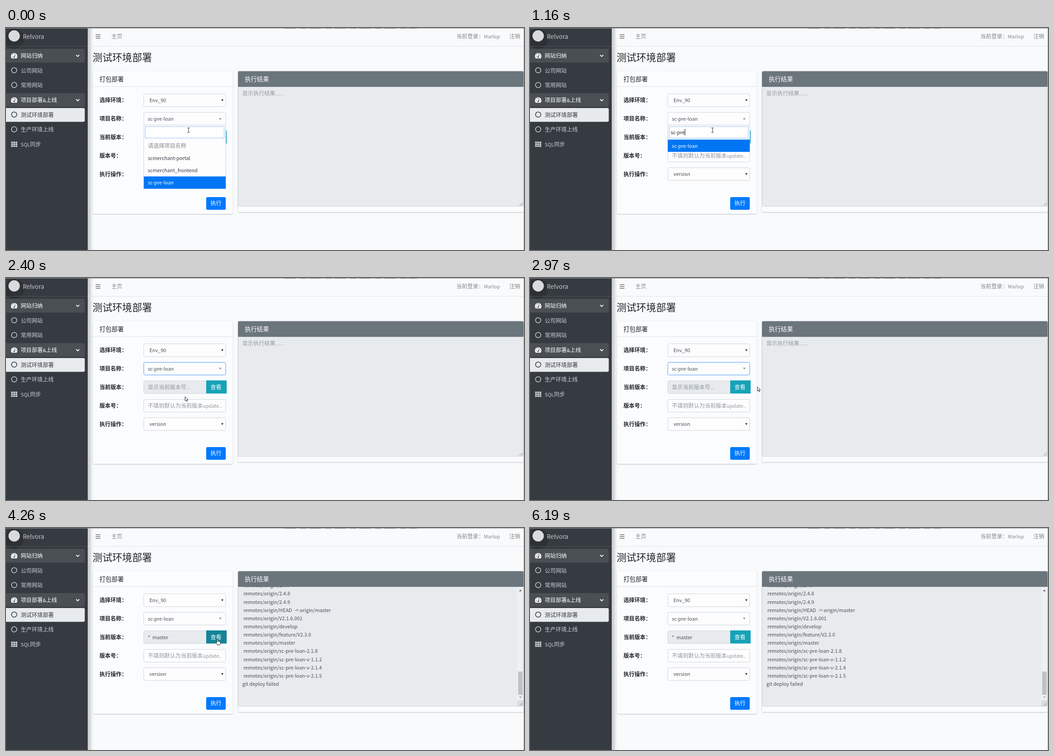
An HTML page for the animation above (7120 ms loop, 1141 px wide and 491 px high).

```html
<!DOCTYPE html>
<html lang="zh-CN">
<head>
<meta charset="utf-8">
<title>测试环境部署</title>
<style>
  html, body { margin: 0; width: 100%; height: 100%; overflow: hidden; background: #f9fafc; }
  svg { display: block; width: 100%; height: 100%; }
  text { font-family: "Noto Sans CJK SC", "Noto Sans CJK", sans-serif; white-space: pre; }
</style>
</head>
<body>
<svg id="stage" viewBox="0 0 1141 491">
  <defs>
    <linearGradient id="edge">
      <stop stop-color="#c9cccf"/><stop offset=".45" stop-color="#d9dcde"/>
      <stop offset=".6" stop-color="#edeff1"/><stop offset="1" stop-color="#f9fafc"/>
    </linearGradient>
    <filter id="cardShadow"><feDropShadow dx="0" dy=".8" stdDeviation="1" flood-opacity=".28"/></filter>
    <clipPath id="outputClip"><rect x="511" y="130" width="615" height="264"/></clipPath>
  </defs>
  <g id="page"></g>
  <g id="live"></g>
</svg>
<script>
const LOOP = 7120;
const BASE = 12.1;
const LATIN_SCALE = 0.895; // Latin glyphs are drawn smaller than the CJK ones
const INK = '#495057', MUTED = '#8f969c', PALE = '#c8cdd4', BORDER = '#ced4da';

const page = document.getElementById('page');
const live = document.getElementById('live');
let layer = page;

function add(tag, attrs, parent = layer) {
  const node = document.createElementNS('http://www.w3.org/2000/svg', tag);
  for (const key in attrs) node.setAttribute(key, attrs[key]);
  return parent.appendChild(node);
}

const rect = (x, y, width, height, fill, more) => add('rect', { x, y, width, height, fill, ...more });
const path = (d, more) => add('path', { d, fill: 'none', ...more });
const box = (x, y, w, h, fill, stroke = BORDER, rx = 3) =>
  rect(x + .5, y + .5, w - 1, h - 1, fill, { stroke, rx });

// Draws text whose middle line is at y.
function label(x, y, string, fill = INK, size = BASE, weight = 400) {
  const node = add('text', { x, y: y + size * .36, fill, 'font-weight': weight });
  for (const run of string.match(/[\u2e80-\uffff]+|[^\u2e80-\uffff]+/g) || []) {
    const isCjk = run.charCodeAt(0) >= 0x2e80;
    add('tspan', { 'font-size': size * (isCjk ? 1 : LATIN_SCALE) }, node).textContent = run;
  }
  return node;
}

function triangle(x, y, w, h, fill) {
  path(`M${x - w / 2} ${y - h / 2}h${w}l${-w / 2} ${h}z`, { fill });
}

/* ---------- fixed page ---------- */

function gauge(y) {
  path(`M12.6 ${y + 6}A7.2 7.2 0 1 1 23.4 ${y + 6}z`, { fill: '#fff' });
  path(`M18 ${y + 3}L20.4 ${y - 3}`, { stroke: '#474c52', 'stroke-width': 1.3 });
  for (const [dx, dy] of [[-4.5, 1], [-3, -3], [0, -4.5], [4.5, 1], [0, 3]])
    add('circle', { cx: 18 + dx, cy: y + dy, r: dy === 3 ? 1.6 : .9, fill: '#474c52' });
}

function drawSidebar() {
  rect(180, 1, 14, 490, 'url(#edge)');
  rect(0, 0, 180, 491, '#363b41');
  add('circle', { cx: 18, cy: 24, r: 22, fill: '#2d3136' });
  add('circle', { cx: 18, cy: 17.5, r: 12.5, fill: '#d9dadb' });
  label(37, 18.5, 'Relvora', '#c5c8cb', 15, 300);
  rect(0, 40, 180, 1, '#4b5259');

  const items = ['网站归纳', '公司网站', '常用网站', '项目部署&上线', '测试环境部署', '生产环境上线', 'SQL同步'];
  items.forEach((name, i) => {
    const y = 61.3 + i * 32.67;
    const isGroup = i === 0 || i === 3, isActive = i === 4;
    if (isGroup || isActive)
      rect(-4, Math.round(y - 15), 177.5, 30.5, isActive ? '#e8ebed' : '#4a4f54', { rx: 3 });
    const color = isGroup ? '#fff' : isActive ? '#343a40' : PALE;
    label(32.5, y + .3, name, color);
    if (isGroup) {
      gauge(y);
      path(`M154.5 ${y - 1.7}l3.5 3.5l3.5 -3.5`, { stroke: '#fff', 'stroke-width': 1.8 });
    } else if (i < 6) {
      add('circle', { cx: 18, cy: y - .5, r: 5.8, fill: 'none', stroke: color, 'stroke-width': 1.5 });
    } else {
      for (let k = 0; k < 9; k++)
        rect(11.3 + k % 3 * 4.8, y - 6 + Math.floor(k / 3) * 4.2, 4, 3.4, PALE, { rx: .5 });
    }
  });
}

function drawNavbar() {
  rect(180, 40, 961, 1, '#dee2e6');
  for (const y of [14, 18, 22]) rect(197.5, y, 10.5, 1.5, '#6d7073');
  label(232, 19, '主页', '#868789');
  label(992, 19, '当前登录：Marlop', '#868789');
  label(1108.5, 19, '注销', '#868789');
  rect(0, 0, 1141, 1, '#8d9093');
  path('M613 .5H905', { stroke: '#44484c', 'stroke-dasharray': '26 9 14 6' });
}

function drawCards() {
  label(190.7, 64.9, '测试环境部署', '#212529', 21.8);
  const shadow = { rx: 3, filter: 'url(#cardShadow)' };
  rect(191.5, 95.5, 308, 315.5, '#fbfcfe', shadow);
  rect(191.5, 129, 308, 1, '#dfe2e5');
  label(206, 113, '打包部署', '#212529', 13.3);
  ['选择环境', '项目名称', '当前版本', '版本号', '执行操作'].forEach((name, i) =>
    label(206, 160 + i * 40.8, name + '：', '#212529', BASE, 700));

  rect(511, 95.5, 629, 311.5, '#fbfcfe', shadow);
  path('M511 130V98.5q0-3 3-3H1137q3 0 3 3V130z', { fill: '#6b757c' });
  label(526, 113, '执行结果', '#fff', 13.3, 500);
  box(511, 130, 629, 265, '#e8ebee', BORDER, 2);
  rect(1140, 0, 1, 491, '#aeb2b5');

  box(303, 145, 181.5, 29.5, '#fdfdfe');
  label(316, 160, 'Env_90');
  triangle(476.5, 160, 5, 4.5, '#343a40');
  box(303, 268, 181.5, 29, '#fdfdfe');
  label(312.5, 282.5, '不填则默认为当前版本update..', MUTED);
  box(303, 308.5, 181.5, 29, '#fdfdfe');
  label(316, 323, 'version');
  triangle(476.5, 323.3, 5, 4.5, '#343a40');
  rect(441, 374, 43, 28, '#0079fb', { rx: 3 });
  label(450.5, 388, '执行', '#fff');
}

/* ---------- moving parts ---------- */

const OPTIONS = ['请选择项目名称', 'scmerchant-portal', 'scmerchant_frontend', 'sc-pre-loan'];
const KEY_TIMES = [280, 490, 680, 890, 980, 1160];
const CLOSE = 1900, CLICK = 3390, RESULT = 4200;

const BRANCHES = ['2.4.7', '2.4.8', '2.4.9', 'HEAD  -> origin/master', 'V2.1.6.001', 'develop', 'feature/V2.3.0',
  'master', 'sc-pre-loan-2.1.8', 'sc-pre-loan-v-1.1.2', 'sc-pre-loan-v-2.1.4', 'sc-pre-loan-v-2.1.5'];

const MOVES = [
  { start: 1900, end: 2400, steps: 9, points: [[402, 226], [400, 248], [396, 264], [394, 262]] },
  { start: 2610, end: 3240, steps: 11, points: [[394, 262], [430, 261], [475, 252], [510, 236], [488, 240], [466, 246]] },
  { start: 5720, end: 6190, steps: 10, points: [[466, 246], [640, 330], [880, 430], [1060, 500]] },
];

function cursorAt(t) {
  const move = MOVES.filter(m => t >= m.start).pop();
  if (!move) return [402, 226];
  const { start, end, steps, points } = move;
  const step = Math.min(steps, 1 + Math.floor((t - start) / (end - start) * (steps - 1) + 1e-6));
  const along = step / steps * (points.length - 1);
  const i = Math.min(points.length - 2, Math.floor(along));
  return [0, 1].map(k => points[i][k] + (points[i + 1][k] - points[i][k]) * (along - i));
}

function drawDropdown(t) {
  const query = 'sc-pre'.slice(0, KEY_TIMES.filter(k => t >= k).length);
  const matches = OPTIONS.filter(name => name.includes(query));
  box(303, 214, 181.5, 33 + matches.length * 27.2, '#fdfdfe', BORDER, 1);
  box(306, 217.5, 175, 26.5, '#fff', '#8fc3f7', 0);
  const typed = label(310, 230.5, query, '#212529');
  if (query && t < 1690) rect(310 + typed.getComputedTextLength(), 223.5, 1, 14, '#000');
  matches.forEach((name, i) => {
    const y = 260.3 + i * 27.2;
    const selected = name === 'sc-pre-loan';
    if (selected) rect(303.5, y - 13.6, 180.5, 27.2, '#0076f5');
    label(312.5, y, name, selected ? '#fff' : name === OPTIONS[0] ? '#85898d' : '#343a40');
  });
}

function drawOutput() {
  const clip = add('g', { 'clip-path': 'url(#outputClip)' });
  [...BRANCHES.map(name => ' remotes/origin/' + name), 'git deploy failed'].forEach((line, i) =>
    clip.append(label(520.5, 126.9 + i * 18.14, line)));
  rect(1126, 131, 13.5, 250, '#eff0f2');
  rect(1128, 317.5, 10, 51.5, '#c1c2c4');
  rect(1126, 381, 13.5, 13, '#dcdddf');
  triangle(1133, 138, 6, -3.5, '#505356');
  triangle(1133, 374.5, 6, 3.5, '#a3a5a8');
}

function drawCursor(kind, x, y) {
  const g = add('g', { transform: `translate(${x} ${y})` });
  const shapes = {
    beam: 'M-2.5-5H-.7L0-4.5L.7-5H2.5M0-4.5V4.5M-2.5 5H-.7L0 4.5L.7 5H2.5',
    arrow: 'M.5.5V9.8L2.7 7.8L4.2 11L5.8 10.3L4.3 7.2H7.2z',
    hand: 'M-1.2 7.5V1Q-1.2 0 0 0T1.2 1V4.5Q2.8 4 3.2 5Q4.6 4.6 5 5.6Q6.4 5.4 6.4 6.8V9L5 12.5H-.7L-3.7 8.2Q-4 6.8-2.8 6.8z',
  };
  g.append(path(shapes[kind], {
    stroke: '#222', 'stroke-linejoin': 'round', fill: kind === 'beam' ? 'none' : '#fff',
  }));
}

function draw(t) {
  live.replaceChildren();
  layer = live;
  const [x, y] = cursorAt(t);
  const open = t < CLOSE;
  const hover = !open && x > 441 && x < 486 && y > 227 && y < 256;
  const done = t >= RESULT;

  box(303, 186, 181.5, 29, '#fdfdfe', !open && t < CLICK ? '#4b9bf5' : BORDER);
  label(312.5, 201, 'sc-pre-loan');
  triangle(472, 200.3, 6, open ? -3.5 : 3.5, '#85888b');

  box(303, 227, 139, 29, '#e8ebee');
  label(312.5, 241.5, done ? '*  master' : '显示当前版本号...', done ? INK : MUTED);
  const pressed = t >= CLICK && !done;
  rect(441, 226.5, 45, 29, hover ? (pressed ? '#117a8b' : '#138496') : '#17a2b8');
  label(450.5, 241.5, '查看', '#fff');

  if (open) drawDropdown(t);
  if (done) drawOutput();
  else label(520.5, 145, '显示执行结果......', '#949a9f');
  path('M1131 393L1138 386M1135 393L1138 390', { stroke: '#777b7f', 'stroke-width': .9 });
  if (y < 491) drawCursor(open ? 'beam' : hover ? 'hand' : 'arrow', x, y);
}

drawSidebar();
drawNavbar();
drawCards();

const began = performance.now();
function tick() {
  draw((performance.now() - began) % LOOP);
  requestAnimationFrame(tick);
}
tick();
</script>
</body>
</html>
```
